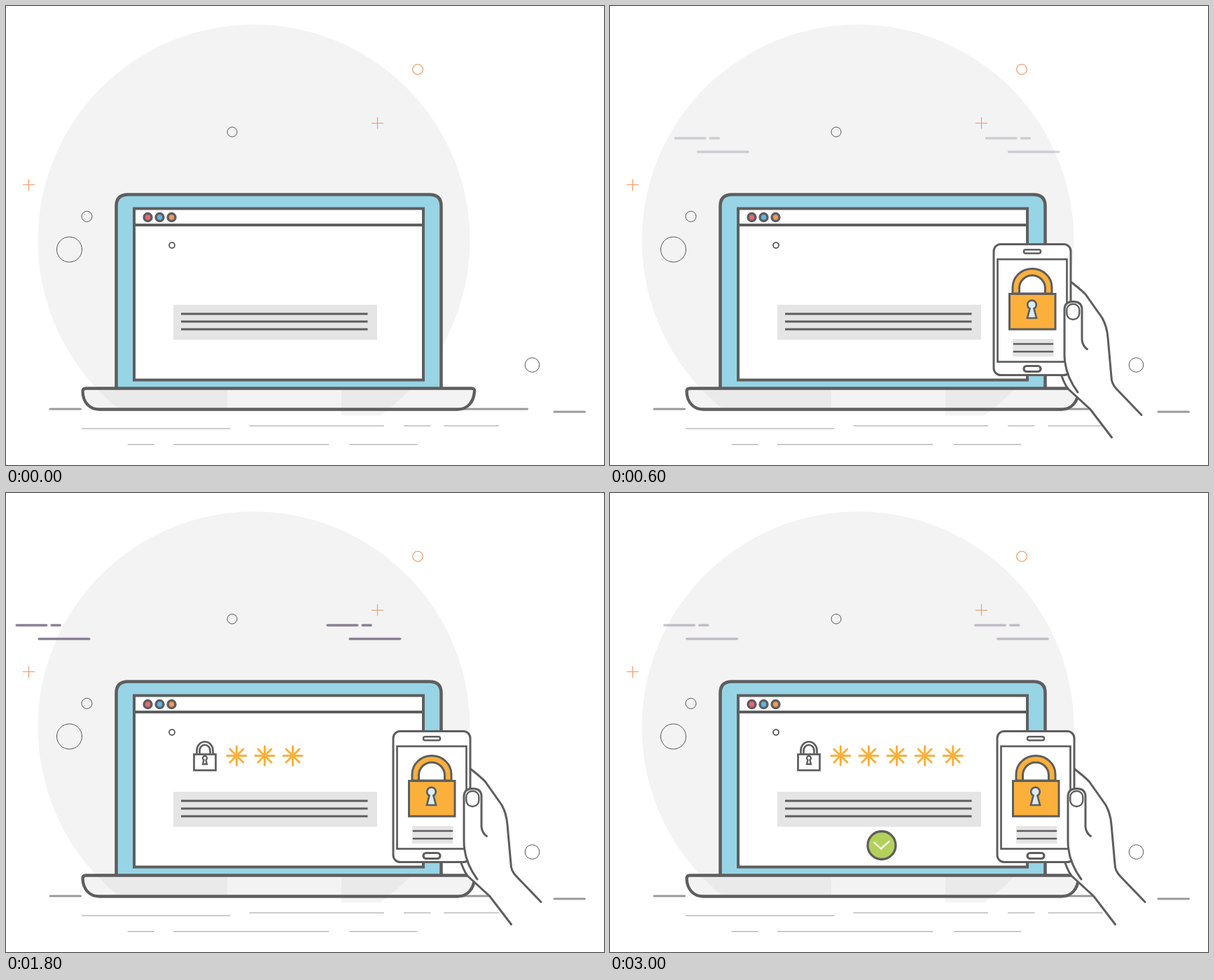
An HTML page for the animation above (3040 ms loop, 854 px wide and 656 px high).

```html
<!DOCTYPE html>
<html lang="en">
<head>
<meta charset="utf-8">
<title>Secure sign-in</title>
<style>
html, body { margin: 0; width: 100%; height: 100%; overflow: hidden; background: #fff; }
svg { display: block; width: 100vw; height: 100vh; }
.ink { stroke: #5e5e5e; fill: none; }
.w { fill: #fff; }
.thin { stroke: #555; fill: none; stroke-width: 1; }
.warm { stroke: #f0955f; fill: none; stroke-width: 1.1; }
.ground { stroke: #9a9a9a; fill: none; stroke-linecap: round; }
.drift { stroke: #7d7289; stroke-width: 3.5; stroke-linecap: round; fill: none; }
.grey { fill: #e5e5e5; }
.gold { fill: #fcb03c; }
</style>
</head>
<body>
<svg viewBox="0 0 854 656">
  <defs>
    <clipPath id="disc"><circle cx="354" cy="335" r="308.5"/></clipPath>
    <g id="wisps"><path class="drift" d="M1.5 189H44M51.5 189H63.5M33.5 208.5H105"/></g>
    <path id="star" d="M-13.5 0H13.5M0 -13.5V13.5M-9.5 -9.5L9.5 9.5M9.5 -9.5L-9.5 9.5"
      stroke="#fbb03b" stroke-width="3" stroke-linecap="round"/>
  </defs>

  <g clip-path="url(#disc)"><rect width="854" height="577" fill="#f3f3f3"/></g>

  <g class="thin">
    <circle cx="323" cy="180" r="7"/>
    <circle cx="115.5" cy="300.8" r="7.5"/>
    <circle cx="90.5" cy="348" r="18"/>
    <circle cx="751.5" cy="513" r="10.3"/>
  </g>
  <g class="warm">
    <circle cx="588" cy="90.5" r="7.3"/>
    <path d="M522 167.5H539M530.5 159V175.500M24 255.500H41M32.500 247.500V264"/>
  </g>

  <g id="drift">
    <use href="#wisps"/>
    <use href="#wisps" x="444"/>
  </g>

  <path class="ground" stroke-width="3" d="M63 576H106.500M650 576H744.500M783 580H826.500"/>
  <path class="ground" stroke-width="1.1"
    d="M108.500 604H320M348 600H539.500M568.500 600H606M626 600H703.500M174 626.700H211.500M239.500 626.700H461M491 626.700H587"/>

  <g class="ink">
    <path d="M157.500 546V286Q157.500 269.500 174 269.500H605Q621.500 269.500 621.500 286V546" fill="#97d4e6" stroke-width="4.500"/>
    <rect class="w" x="183" y="289.500" width="413" height="245" stroke-width="4"/>
    <path d="M183 313H596" stroke-width="3.800"/>
    <g stroke-width="3.500">
      <circle cx="202.500" cy="302" r="5.400" fill="#ec6478"/>
      <circle cx="219.500" cy="302" r="5.400" fill="#62b4e2"/>
      <circle cx="236.500" cy="302" r="5.400" fill="#f0985f"/>
    </g>
    <circle cx="237" cy="342" r="4" stroke="#444" stroke-width="1.600"/>
    <rect class="grey" x="239" y="427" width="291" height="50" stroke="none"/>
    <path d="M250 440H516.500M250 451H516.500M250 462H516.500" stroke-width="2.900"/>
  </g>

  <path id="base" fill="#f4f3f4" d="M114 546.500H665Q669.500 546.500 669 551C668 566 659 576.500 645 576.500H133C119 576.500 110 566 109.500 551Q109.500 546.500 114 546.500Z"/>
  <g clip-path="url(#disc)">
    <path fill="#ebeaeb" d="M120 547H316V576H120ZM479 547H600V576H479Z"/>
    <path fill="#f3f3f3" d="M479 576H560V585H479Z"/>
  </g>
  <use href="#base" class="ink" style="fill-opacity:0" stroke-width="4.300"/>

  <g id="lock" class="ink" stroke-width="2.700">
    <path class="w" d="M272.500 373V368a11.500 12.500 0 0 1 23 0V373M276.500 373V368a7.500 8 0 0 1 15 0V373"/>
    <rect class="w" x="268.500" y="373.500" width="31" height="22.800"/>
    <path stroke-width="2.300" d="M282.500 381.500a3 3 0 1 1 3 0L287 387.500H281Z"/>
  </g>

  <g id="stars"></g>

  <g id="check">
    <circle class="ink" cx="388" cy="503.500" r="20" style="fill:#b2d15b" stroke-width="3.300"/>
    <path d="M377.500 499.500L387 508.500L398.500 498" fill="none" stroke="#fff" stroke-width="2.400" stroke-linecap="round"/>
  </g>

  <g id="phone" class="ink" stroke-width="3" stroke-linecap="round">
    <g>
      <path class="w" d="M764 584.500L729 548Q721 540 721 530L716 474C715 462 713 455 708 446L684 412C674 402 664 395 655 388C644 392 642 440 640 485C640 500 650 535 659 547L691 576.500L721.500 616.500"/>
    </g>
    <g>
      <rect class="w" x="553" y="340.500" width="110" height="187" rx="10"/>
      <rect class="w" x="558.500" y="362" width="99" height="146.500" stroke-width="2.700"/>
      <rect x="596" y="348.300" width="24" height="5.200" rx="2.500" stroke-width="2.500"/>
      <rect x="596" y="514.500" width="24" height="8" rx="4" stroke-width="3.200"/>
      <path class="gold" d="M580 411V402a28 26.500 0 0 1 56 0V411Z"/>
      <path class="w" d="M589.500 411V403.500a18.500 18.500 0 0 1 37 0V411Z"/>
      <rect class="gold" x="575.500" y="411.500" width="65.500" height="50.500" stroke-linejoin="miter"/>
      <path fill="#d9edf6" stroke-width="2.700" d="M604.500 432.500a6.300 6.300 0 1 1 6 0L614 446H601Z"/>
      <rect class="grey" x="580" y="476" width="58.500" height="25" stroke="none"/>
      <path d="M582 483H637M582 494H637" stroke-width="2.700"/>
    </g>
    <g>
      <path class="w" d="M673 552C662 537 654 518 654 498V434Q654 422.500 666.500 422.500Q679 422.500 679 434V477Q680 486 686.500 490.500"/>
      <rect class="w" x="657.300" y="426" width="18" height="22" rx="8.500" stroke-width="2.400"/>
    </g>
  </g>
</svg>
<script>
const LOOP = 3040, TICK = 40, CYCLE = 2160, LIFE = 2040;
const $ = id => document.getElementById(id);
const clamp = v => Math.max(0, Math.min(1, v));
const fade = (t, start, span) => clamp((t - start) / span);

// time, x offset, opacity
const slide = [
  [200, 132, 0], [240, 120, 0.1], [440, 50, 0.6], [560, -8, 1],
  [600, -5, 1], [680, 2, 1], [760, 0, 1]
];
const starTimes = [1340, 1500, 1660, 1840, 2040];

const stars = starTimes.map((_, i) => {
  const s = document.createElementNS('http://www.w3.org/2000/svg', 'use');
  s.setAttribute('href', '#star');
  s.setAttribute('transform', `translate(${329.3 + 40.1 * i} 375.5)`);
  return $('stars').appendChild(s);
});

function sample(keys, t) {
  if (t <= keys[0][0]) return keys[0].slice(1);
  const i = keys.findIndex(k => k[0] >= t);
  if (i < 0) return keys[keys.length - 1].slice(1);
  const a = keys[i - 1], b = keys[i], p = (t - a[0]) / (b[0] - a[0]);
  return [1, 2].map(j => a[j] + (b[j] - a[j]) * p);
}

function draw(t) {
  const age = t % CYCLE;
  $('drift').style.opacity = t < 240 || age > LIFE ? 0 : clamp(age / 2000);
  $('drift').setAttribute('transform', `translate(${131 - age * 0.0652} 0)`);

  const [x, alpha] = sample(slide, t);
  $('phone').setAttribute('transform', `translate(${x} 0)`);
  // each layer fades alone, so the hand shows through the phone
  for (const layer of $('phone').children) layer.style.opacity = t < 240 ? 0 : alpha;

  $('lock').style.opacity = fade(t, 880, 200);
  stars.forEach((s, i) => s.style.opacity = fade(t, starTimes[i], 120));
  $('check').style.opacity = fade(t, 2360, 280);
}

const origin = performance.now();
function loop() {
  const t = (performance.now() - origin) % LOOP;
  draw(Math.floor(t / TICK) * TICK);
  requestAnimationFrame(loop);
}
loop();
</script>
</body>
</html>
```
